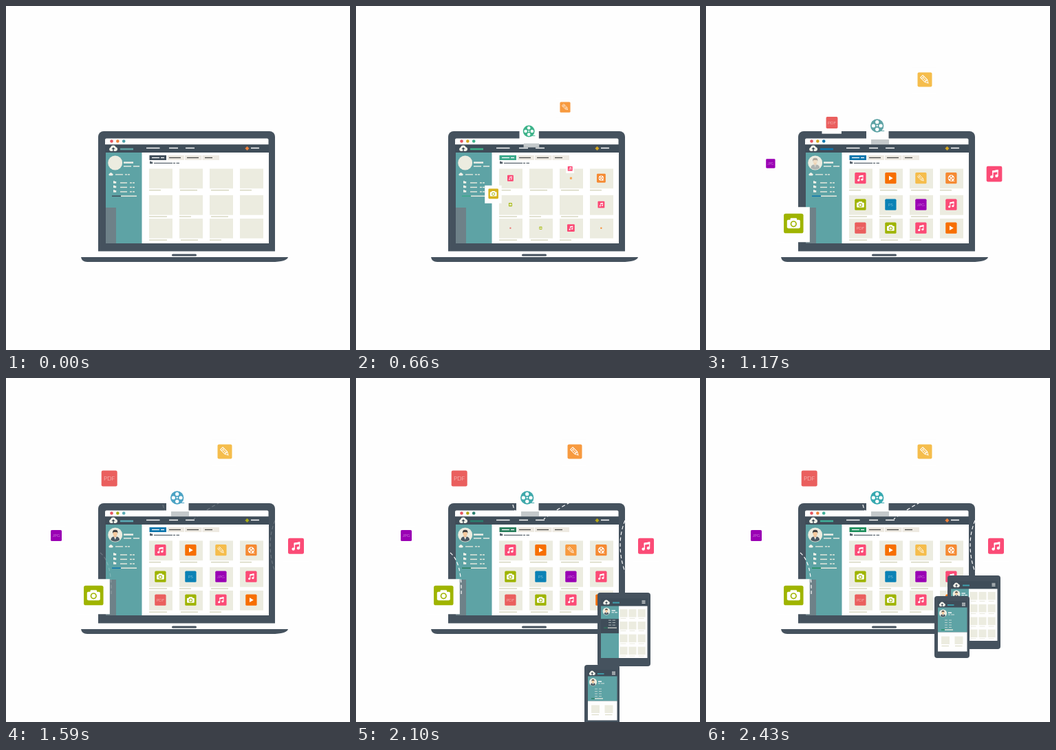
Write an HTML page with a canvas that moves like this. It is 500x500 px and loops after 2730 ms.

```html
<!DOCTYPE html>
<html lang="en">
<head>
<meta charset="utf-8">
<title>Cloud files on every device</title>
<style>
html, body { margin: 0; width: 100%; height: 100%; overflow: hidden; background: #fefefe; }
canvas { display: block; }
</style>
</head>
<body>
<canvas id="stage" width="500" height="500"></canvas>
<script>
const c = document.getElementById('stage').getContext('2d');
const LOOP = 2730, STEP = 30;
const PAPER = '#fefefe', BODY = '#45525e', NAV = '#3f4d59', TEAL = '#5ea3a5', CREAM = '#ecece0', CAPTION = '#d5d5bd';

// start time, accent, reel, middle dot, last dot, pencil
const palettes = [
  [0, '#3f4d59', '#5ea3a5', '#f0813a', '#4a9fa8', '#f79a3f'],
  [600, '#3aa98a', '#3db38a', '#d6a51c', '#3db38a', '#f79a3f'],
  [1140, '#0b76ad', '#5ea3a5', '#d6a51c', '#0b76ad', '#f5bd4c'],
  [1410, '#0b76ad', '#4ba3c4', '#a9ac14', '#5aabb5', '#f5bd4c'],
  [1680, '#0b76ad', '#5ea3a5', '#f0813a', '#0b76ad', '#f79a3f'],
  [1980, '#2a7f5e', '#3fa9ab', '#b5a514', '#2a7f6e', '#f79a3f'],
  [2310, '#21905f', '#36a9b0', '#f0813a', '#3fb09a', '#f5bd4c']
];
const colors = {
  music: '#fb4b76', play: '#f76f00', film: '#f58a33', camera: '#9fb400',
  PS: '#0b82b5', JPG: '#9a00b4', PDF: '#ea5f5e'
};
let accent, reelColor, dot2, dot3;

const progress = (t, start, length) => Math.min(1, Math.max(0, (t - start) / length));
const easeOut = p => 1 - (1 - p) ** 2;
const easeInOut = p => (1 - Math.cos(Math.PI * p)) / 2;

function rect(x, y, w, h, color, radius = 0) {
  c.fillStyle = color;
  c.beginPath();
  c.roundRect(x, y, w, h, radius);
  c.fill();
}
function circle(x, y, r, color) {
  c.fillStyle = color;
  c.beginPath();
  c.arc(x, y, r, 0, 7);
  c.fill();
}
function shape(path, color) {
  c.fillStyle = color;
  c.fill(new Path2D(path));
}
function stroke(path, width, color = '#fff') {
  c.strokeStyle = color;
  c.lineWidth = width;
  c.stroke(new Path2D(path));
}
// horizontal bars given as [from, to] pairs
function bars(y, h, color, ...spans) {
  for (const [from, to] of spans) rect(from, y - h / 2, to - from, h, color);
}
function at(x, y, scale, draw) {
  c.save();
  c.translate(x, y);
  c.scale(scale, scale);
  draw();
  c.restore();
}

function reel(r, color, holes) {
  circle(0, 0, r, color);
  for (let i = 0; i < 4; i++) {
    const a = i * Math.PI / 2;
    circle(Math.cos(a) * r * .55, Math.sin(a) * r * .55, r * .27, holes);
  }
  circle(0, 0, r * .12, holes);
}

const glyphs = {
  music() {
    circle(-4, 4.5, 2.3, '#fff');
    circle(3.6, 3, 2.3, '#fff');
    stroke('M-2.3 4.5V-4.2L5.3-5.6V3', 1.4);
    shape('M-3-4.8L6-6.4V-3.2L-3-1.6Z', '#fff');
  },
  play() { shape('M-3.5-5L5 0L-3.5 5Z', '#fff'); },
  film() {
    reel(6.8, '#fff', colors.film);
    stroke('M1 6.3H7.5', 1);
  },
  camera() {
    rect(-8, -4.5, 16, 10.5, '#fff', 1.5);
    rect(-4, -6.5, 8, 4, '#fff', 1);
    circle(0, .7, 3.9, colors.camera);
    circle(0, .7, 2.5, '#fff');
  },
  pencil() {
    c.rotate(Math.PI / 4);
    stroke('M-7.5-2.8H3L8 0L3 2.8H-7.5ZM-4.8-2.8V2.8M3-2.8V2.8M-4.8 0H3', 1.1);
  }
};
function icon(kind, x, y, size, color = colors[kind]) {
  if (size <= 0) return;
  at(x, y, size / 24, () => {
    rect(-12, -12, 24, 24, color, 2.4);
    if (glyphs[kind]) return glyphs[kind]();
    c.fillStyle = '#ffffffd0';
    c.font = '300 9px Lato, sans-serif';
    c.textAlign = 'center';
    c.fillText(kind, 0, 3.3);
  });
}

function cloud(x, y, width, arrow) {
  at(x, y, width / 14, () => {
    shape('M-4 4.5A3.3 3.3 0 0 1-4.6-1.8A4.6 4.6 0 0 1 4-2.2A3.4 3.4 0 0 1 4 4.5Z', '#f1f1e9');
    if (arrow) shape('M0-2L2.8 1.2H.8V4.5H-.8V1.2H-2.8Z', NAV);
  });
}
function folder(x, y, color) {
  rect(x - 2, y - 1.7, 2, 2, color);
  rect(x - 2, y - 1, 4.2, 2.8, color);
}
function avatar(x, y, r, visible) {
  circle(x, y, r, CREAM);
  c.save();
  c.globalAlpha = visible;
  at(x, y, r / 10.5, () => {
    shape('M-6.5 7.5Q-6 2.8-2 2.5H2Q6 2.8 6.5 7.5Q0 12-6.5 7.5Z', '#4c5a64');
    shape('M-2 2H2L0 7Z', '#fff');
    rect(-1.5, 0, 3, 3.6, '#eab98c');
    rect(-3, -5.5, 6, 7.5, '#f5c99d', 3);
    shape('M-3.6-2Q-4.5-7.5 0-7.3Q4.6-7.5 3.5-2L2.6-4H-2.4Z', '#45413f');
  });
  c.restore();
}
function hamburger(x, y) {
  for (let i = -1; i <= 1; i++) bars(y + i * 1.8, 1, '#e4e7e6', [x - 2.5, x + 2.5]);
}

const columns = [208, 252, 296, 340], rows = [236.5, 275, 309];
// kind and the time it pops up, row by row
const tiles = [
  ['music', 530], ['play', 690], ['pencil', 622], ['film', 444],
  ['camera', 595], ['PS', 700], ['JPG', 680], ['music', 512],
  ['PDF', 636], ['camera', 608], ['music', 492], ['play', 636]
];
const captions = [
  [208, 225], [253, 278], [298, 324], [340, 357],
  [208, 234], [252, 269], [298, 323], null,
  [208, 234], [254, 279], [296, 313], null
];

function laptop(t) {
  rect(134, 182, 257, 174.5, BODY, [8, 8, 0, 0]);
  rect(144, 192.5, 237.5, 9, PAPER, [2, 2, 0, 0]);
  circle(153.5, 196.5, 2.3, '#e8555f');
  circle(162.3, 196.5, 2.3, dot2);
  circle(171.2, 196.5, 2.3, dot3);

  rect(144, 201.5, 238, 11.5, NAV);
  cloud(156, 207, 12.5, true);
  bars(208, 2.6, t < 600 ? TEAL : dot3, [166, 185]);
  bars(206.5, 1.5, '#fff', [204, 223.5], [237, 250], [261, 274], [356, 368]);
  shape('M350.5 204L353.5 207L350.5 210L347.5 207Z', dot2);

  rect(197, 213, 185, 132, '#fff');
  rect(145, 213, 52.5, 132, TEAL);
  rect(145, 293, 15, 52, '#6e8188');
  avatar(158.7, 228, 10.5, progress(t, 1100, 180));
  bars(227.6, 2.4, '#f1f1e9', [171, 185]);
  bars(233, 1.4, '#f1f1e9', [171, 182], [185, 194]);
  cloud(152.5, 244.5, 6.5);
  bars(245, 1.3, CREAM, [159, 170], [173, 176], [177, 180]);
  for (const y of [256, 262.5, 269]) {
    folder(158, y, '#f1f1e9');
    bars(y + 1, 1.4, CREAM, [166, 176], [180, 183], [184, 187]);
  }
  bars(276.3, 1.5, accent, [154, 167]);
  bars(276.3, 1.5, CREAM, [167, 190]);

  [208.5, 234.5, 260, 285.5].forEach((x, i) => rect(x, 217, 24.5, 7, i ? '#eeeae2' : accent));
  bars(220.5, 1.3, '#fff', [212, 223], [225, 230]);
  bars(220.5, 1.3, '#4a4a48', [237, 254], [263, 280], [289, 300]);
  folder(211, 227.5, '#55606a');
  bars(228.4, 1.2, '#55606a', [215, 242], [243, 246], [247.5, 252]);

  tiles.forEach(([kind, start], i) => {
    const x = columns[i % 4], y = rows[i >> 2];
    rect(x, y, 34, 28.8, CREAM);
    if (captions[i]) bars(y + 31.2, 1.4, CAPTION, captions[i]);
    icon(kind, x + 16.4, y + 13.7, 16.3 * easeOut(progress(t, start, 400)));
  });

  shape('M109 365H410Q408 372 386 372H118Q110 372 109 365Z', BODY);
  rect(241, 360.4, 36, 3.2, BODY, 1.5);
}

function trails(t) {
  c.save();
  c.globalAlpha = progress(t, 1500, 420);
  c.setLineDash([5, 3.5]);
  stroke('M137 254Q154 268 153 314', 1.2);
  stroke('M228 184Q229 190 233 196', 1.2);
  stroke('M311 181Q293 190 273 205', 1.2);
  stroke('M391 207Q377 242 391 282', 1.2);
  c.restore();
}

// kind, start, duration, end x, end y, end size; all leave from the screen
const flights = [
  ['reel', 250, 640, 248.7, 174, 19.5, 268, 236],
  ['pencil', 300, 765, 318, 107, 21, 268, 250],
  ['camera', 480, 600, 127.3, 316, 28.5, 275, 228],
  ['music', 543, 717, 421.5, 244.3, 23, 264, 233],
  ['JPG', 887, 476, 73, 229, 16, 200, 229],
  ['PDF', 940, 476, 150.2, 146, 23, 273, 234]
];
function fly(t, [kind, start, length, endX, endY, endSize, startX, startY]) {
  const e = easeOut(progress(t, start, length));
  if (!e) return;
  const x = startX + (endX - startX) * e, y = startY + (endY - startY) * e, size = endSize * e;
  const card = size * 1.72;
  if (kind === 'reel') {
    rect(x - 8.7 * e, y + 20 * e, 26 * e, 7 * e, '#c4c9cb');
    rect(x - 15.7 * e, y - 13 * e, 32.5 * e, 33 * e, PAPER);
    at(x, y, e, () => {
      reel(9.7, reelColor, '#fff');
      stroke('M3 7.6H10.5', 1, reelColor);
    });
    return;
  }
  rect(x - card / 2, y - card / 2 + size * .03, card * .98, card * 1.04, PAPER);
  icon(kind, x, y, size, kind === 'camera' && t < 900 ? '#d6b41e' : colors[kind]);
}

function tablet(y) {
  c.save();
  c.translate(351, y);
  rect(0, 0, 77, 107, BODY, 4);
  rect(5, 8.5, 68, 11, NAV);
  cloud(13, 14, 10, true);
  bars(14.5, 2, '#3fa0ae', [22, 32]);
  hamburger(67, 13.5);
  rect(31, 19.5, 41.5, 75.5, PAPER);
  rect(5, 19.5, 26, 75.5, TEAL);
  avatar(13, 27, 5.4, 1);
  bars(26, 1.3, '#fff', [20.5, 26]);
  bars(28.7, 1, '#fff', [20.5, 24], [25, 29]);
  rect(5, 38, 26, 21, NAV);
  for (const row of [40, 43.5, 47]) bars(row, .9, '#b9c3c4', [16, 20], [21.5, 26]);
  bars(51, 1.1, accent, [9, 15]);
  bars(51, 1.1, CREAM, [15, 28]);
  for (const top of [24, 42, 60.5, 78.5])
    for (const left of [32.5, 45.5, 58.7]) {
      rect(left, top, 11, 11.5, CREAM);
      bars(top + 13.5, .8, '#e4e4d6', [left + 1, left + 9]);
    }
  c.restore();
}

function phone(y) {
  c.save();
  c.translate(332, y);
  rect(0, 0, 51, 90, BODY, 4);
  rect(5, 7, 42.5, 9.5, NAV);
  cloud(11.3, 12, 9.5, true);
  bars(13, 1.8, '#3fa0ae', [19, 28.5]);
  hamburger(42.5, 12);
  rect(5, 16.5, 42.5, 36, TEAL);
  avatar(12.5, 25, 5.6, 1);
  bars(24.2, 1.4, '#fff', [20, 25]);
  bars(27, .9, '#dfe8e4', [20, 23], [24, 29]);
  for (const row of [35, 38.5, 42, 45.5]) bars(row, .9, '#c4d8d4', [15, 19], [21, 25]);
  bars(49, 1.3, accent, [10, 15]);
  bars(49, 1.3, CREAM, [15, 27]);
  rect(5, 52.5, 42.5, 28, PAPER);
  for (const left of [10, 29.5]) {
    rect(left, 58.5, 12, 11.5, CREAM);
    bars(72.5, .9, CAPTION, [left + .5, left + 11]);
  }
  c.restore();
}

function draw(now) {
  const t = Math.floor(now % LOOP / STEP) * STEP;
  [, accent, reelColor, dot2, dot3, colors.pencil] = palettes.findLast(p => p[0] <= t);
  rect(0, 0, 500, 500, PAPER);
  laptop(t);
  trails(t);
  flights.forEach(flight => fly(t, flight));
  tablet(515 - 228 * easeInOut(progress(t, 1484, 785)));
  phone(515 - 198 * easeInOut(progress(t, 1777, 650)));
}

const begin = performance.now();
function loop() {
  draw(performance.now() - begin);
  requestAnimationFrame(loop);
}
loop();
</script>
</body>
</html>
```
